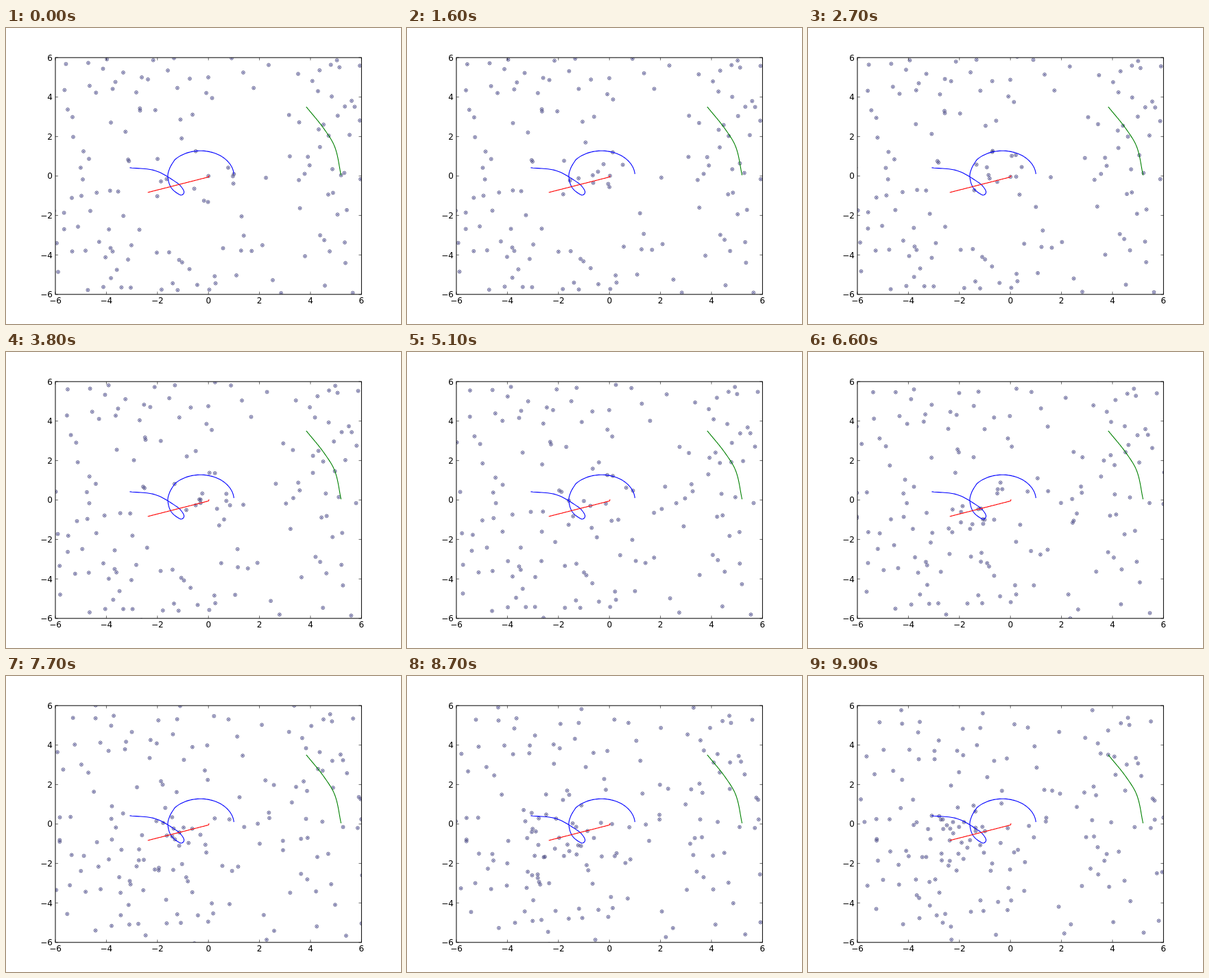
Animation of 576 by 432 pixels, one loop 10 s. Source, as an HTML page:

```html
<!DOCTYPE html>
<html lang="en">
<head>
<meta charset="utf-8">
<title>Orbits</title>
<style>
html, body { margin: 0; width: 100%; height: 100%; overflow: hidden; background: #fff; }
svg { display: block; width: 576px; height: 432px; }
text { font: 12px "DejaVu Sans", sans-serif; fill: #000; }
path { fill: none; }
#rings { fill: #d6d6f2; stroke: #50507c; stroke-width: .8; }
#dots { stroke: #30306c; stroke-width: 1.7; stroke-linecap: round; }
.trail { stroke-width: 1.1; stroke-linejoin: round; }
#ticks { stroke: #000; stroke-width: .6; }
#frame { fill: none; stroke: #000; stroke-width: 1; }
</style>
</head>
<body>
<svg viewBox="0 0 576 432">
  <clipPath id="area"><rect x="72" y="43.2" width="446.4" height="345.6"/></clipPath>
  <g clip-path="url(#area)">
    <path id="rings"/>
    <path id="dots"/>
    <path id="earth" class="trail" stroke="#00f"/>
    <path id="giant" class="trail" stroke="#008000"/>
    <path id="sun" class="trail" stroke="#f00"/>
  </g>
  <path id="ticks"/>
  <rect id="frame" x="72" y="43.2" width="446.4" height="345.6"/>
  <g id="labels"></g>
</svg>
<script>
const $ = id => document.getElementById(id);
const FRAMES = 100, STEP = 100, SUBSTEPS = 10;
const CX = 295.2, CY = 216, SX = 37.2, SY = 28.8;
const GM = 0.84, SOFT = 0.02;
const LEFT = 72, RIGHT = 518.4, TOP = 43.2, BOTTOM = 388.8;

// Heavy bodies: [seconds, x, y] in stage pixels
const sunKeys = [[0, 295.2, 216], [1.6, 296, 215.7], [2.9, 295.2, 217.5], [9.9, 206.7, 240]];
const giantKeys = [[0, 488.6, 214.9], [3.8, 479.6, 174], [6.6, 463, 146.2], [9.9, 437.8, 115]];
const earthKeys = [
  [3.8, 245.8, 192.6], [4.45, 238.8, 204.5], [5.1, 236, 217], [6, 241.5, 234], [6.6, 255, 244],
  [6.85, 259.6, 240.5], [7.1, 257.6, 234.5], [7.5, 249.5, 226], [8.7, 217.5, 208.2], [9.9, 180.5, 203.9]
];

// Slow outer bodies, in stage pixels
const outer = [
  245,44, 120,51, 383,54, 516,55, 171,65, 236,62, 346,65, 426,67, 198,72, 207,75,
  268,74, 295,72, 190,94, 475,100, 90,119, 97,130, 153,138, 463,141, 516,135, 456,148,
  501,156, 98,159, 113,180, 121,191, 476,206, 112,221, 110,245, 96,248, 123,267, 105,290,
  74,314, 116,325, 178,338, 142,378, 76,356, 336,361, 494,313, 472,326, 436,333, 495,343,
  465,376, 389,368
];

const toStage = (x, y) => [CX + x * SX, CY - y * SY];
const toPlane = (x, y) => [(x - CX) / SX, (CY - y) / SY];
const slope = (a, b, k) => (b[k] - a[k]) / (b[0] - a[0]);

// Hermite curve through timed keys, or straight segments when not smooth
function at(keys, t, smooth = true) {
  let i = 0;
  while (i < keys.length - 2 && t > keys[i + 1][0]) i++;
  const a = keys[i], b = keys[i + 1], h = b[0] - a[0], u = (t - a[0]) / h;
  return [1, 2].map(k => {
    const m0 = smooth ? slope(keys[i - 1] || a, b, k) : slope(a, b, k);
    const m1 = smooth ? slope(a, keys[i + 2] || b, k) : slope(a, b, k);
    const u2 = u * u, u3 = u2 * u;
    return (2 * u3 - 3 * u2 + 1) * a[k] + (u3 - 2 * u2 + u) * h * m0
      + (3 * u2 - 2 * u3) * b[k] + (u3 - u2) * h * m1;
  });
}

// Ellipse around the resting sun, by Kepler's equation
function kepler(t) {
  const ecc = .238, mean = .59 * (t + .1);
  let E = mean;
  for (let i = 0; i < 20; i++) E = mean + ecc * Math.sin(E);
  return toStage(1.315 * (Math.cos(E) - ecc), 1.277 * Math.sin(E));
}

const sunAt = t => at(sunKeys, t, false);
const giantAt = t => at(giantKeys, t);
const earthAt = t => t < earthKeys[0][0] ? kepler(t) : at(earthKeys, t);

let seed = 20;
function random() {
  seed = (seed + 0x6D2B79F5) | 0;
  let z = Math.imul(seed ^ seed >>> 15, 1 | seed);
  z = z + Math.imul(z ^ z >>> 7, 61 | z) ^ z;
  return ((z ^ z >>> 14) >>> 0) / 4294967296;
}

function makeBodies() {
  const bodies = [];
  const add = (x, y) => bodies.push({ x, y, vx: 0, vy: 0 });
  for (let i = 0; i < outer.length; i += 2) add(...toPlane(outer[i], outer[i + 1]));
  // Fill the gaps, also just outside the view
  const fixed = bodies.slice();
  while (bodies.length < 185) {
    const x = (random() - .5) * 14.2, y = (random() - .5) * 14.2;
    const free = fixed.every(b => Math.hypot(b.x - x, b.y - y) > .5);
    if (free && Math.hypot(x, y) > .7) add(x, y);
  }
  return bodies;
}

function simulate() {
  const bodies = makeBodies(), frames = [], dt = STEP / 1000 / SUBSTEPS;
  for (let f = 0; f < FRAMES; f++) {
    const t = f * STEP / 1000;
    frames.push([...bodies.map(b => toStage(b.x, b.y)), sunAt(t), earthAt(t), giantAt(t)]);
    for (let s = 0; s < SUBSTEPS; s++) {
      const [sx, sy] = toPlane(...sunAt(t + s * dt));
      for (const b of bodies) {
        const dx = sx - b.x, dy = sy - b.y;
        const k = GM * dt / Math.pow(dx * dx + dy * dy + SOFT, 1.5);
        b.vx += dx * k;
        b.vy += dy * k;
        b.x += b.vx * dt;
        b.y += b.vy * dt;
      }
    }
  }
  return frames;
}

function drawTrail(id, pos) {
  const pts = Array.from({ length: FRAMES }, (_, f) => pos(f * STEP / 1000).map(v => v.toFixed(2)).join(" "));
  $(id).setAttribute("d", "M" + pts.join("L"));
}

function addLabel(value, x, y, anchor) {
  const el = document.createElementNS("http://www.w3.org/2000/svg", "text");
  el.textContent = String(value).replace("-", "\u2212");
  el.setAttribute("x", x);
  el.setAttribute("y", y);
  el.setAttribute("text-anchor", anchor);
  $("labels").append(el);
}

function drawAxes() {
  let d = "";
  for (let v = -6; v <= 6; v += 2) {
    const [x, y] = toStage(v, v);
    d += `M${x} ${TOP}v4M${x} ${BOTTOM}v-4M${LEFT} ${y}h4M${RIGHT} ${y}h-4`;
    addLabel(v, x, 402, "middle");
    addLabel(v, 68, y + 4.4, "end");
  }
  $("ticks").setAttribute("d", d);
}

const shapes = simulate().map(points => {
  let rings = "", dots = "";
  for (const [px, py] of points) {
    const x = px.toFixed(2), y = py.toFixed(2);
    rings += `M${x} ${y}m-2.4 0a2.4 2.4 0 1 0 4.8 0a2.4 2.4 0 1 0 -4.8 0`;
    dots += `M${x} ${y}h.01`;
  }
  return { rings, dots };
});

let shown = -1;
function render() {
  const f = Math.floor(performance.now() / STEP) % FRAMES;
  if (f !== shown) {
    shown = f;
    $("rings").setAttribute("d", shapes[f].rings);
    $("dots").setAttribute("d", shapes[f].dots);
  }
  requestAnimationFrame(render);
}

drawAxes();
drawTrail("earth", earthAt);
drawTrail("giant", giantAt);
drawTrail("sun", sunAt);
render();
</script>
</body>
</html>
```
